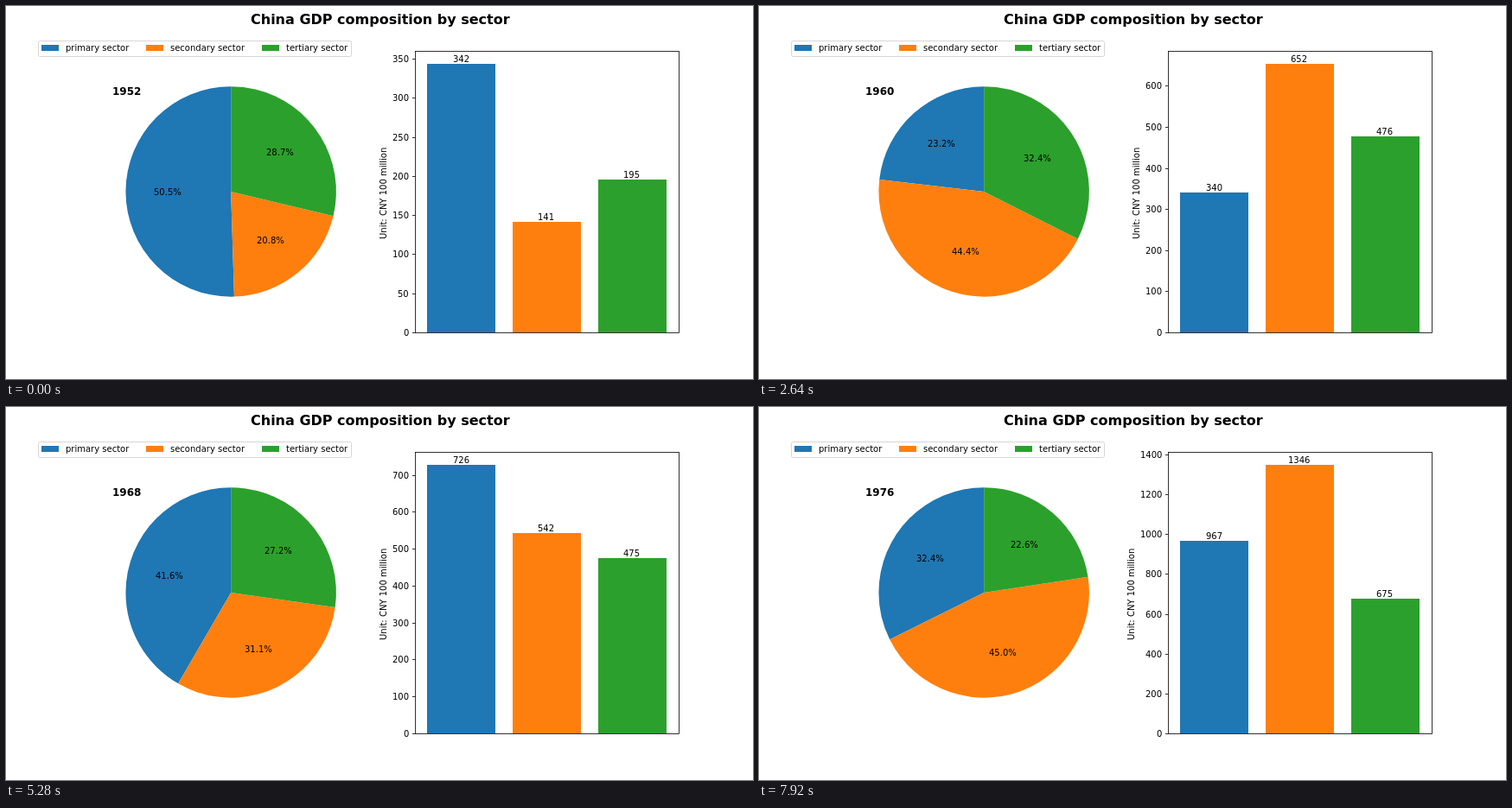
Recreate the animation shown at these times as an HTML page with a canvas. Size 864 px wide and 432 px high, loop 8000 ms.

```html
<!DOCTYPE html>
<html lang="en">
<head>
<meta charset="utf-8">
<title>GDP composition by sector</title>
<style>
  html, body { margin: 0; width: 100%; height: 100%; overflow: hidden; background: #fff; }
  canvas { display: block; }
</style>
</head>
<body>
<canvas id="stage" width="864" height="432"></canvas>
<script>
const ctx = document.getElementById('stage').getContext('2d');
const FIRST_YEAR = 1952, STEP = 330, LOOP = 8000;
const COLORS = ['#1f77b4', '#ff7f0e', '#2ca02c'];
const SECTORS = ['primary sector', 'secondary sector', 'tertiary sector'];
const PIE = { x: 260.18, y: 214.92, r: 121.74 };
const AXES = { left: 473.24, bottom: 378, height: 326.16, unit: 98.82 };

// Turning points of the three sectors; the years between are interpolated.
const KEY_YEARS = {
  1952: [342.9, 141.1, 195.1],
  1955: [421, 221.5, 269.1],
  1957: [430, 317.2, 324.2],
  1958: [445.9, 484.9, 381.5],
  1960: [340.7, 652.5, 476.9],
  1961: [441.1, 391.6, 399.6],
  1963: [497.5, 412.9, 337.9],
  1966: [702.2, 715.1, 471.4],
  1968: [726.3, 542.7, 475.1],
  1970: [793.3, 919.3, 567.1],
  1972: [827.4, 1091.8, 633.2],
  1976: [967, 1346, 675.6]
};

function valuesFor(year) {
  const years = Object.keys(KEY_YEARS).map(Number);
  const from = years.findLast(y => y <= year);
  const to = years.find(y => y >= year);
  const mix = (year - from) / (to - from || 1);
  return KEY_YEARS[from].map((value, i) => value + mix * (KEY_YEARS[to][i] - value));
}

// anchor: 0 = left, 0.5 = centre, 1 = right; returns the text width
function text(str, x, baseline, anchor = 0, font = '10px') {
  ctx.font = `${font} "DejaVu Sans", sans-serif`;
  ctx.fillStyle = '#000';
  const width = ctx.measureText(str).width;
  ctx.fillText(str, Math.floor(x - anchor * width), Math.floor(baseline));
  return width;
}

function fillBox(color, x, y, w, h) {
  ctx.fillStyle = color;
  ctx.fillRect(x, y, w, h);
}

function drawLegend() {
  ctx.strokeStyle = '#d6d6d6';
  ctx.lineWidth = 1;
  ctx.beginPath();
  ctx.roundRect(37.5, 40.5, 362, 18, 2);
  ctx.stroke();
  let x = 41;
  SECTORS.forEach((name, i) => {
    fillBox(COLORS[i], x, 45, 20, 7);
    x = Math.round(x + 48 + text(name, x + 28, 52));
  });
}

function drawPie(values) {
  const total = values.reduce((a, b) => a + b);
  let start = -Math.PI / 2;
  const labels = values.map((value, i) => {
    const sweep = 2 * Math.PI * value / total;
    const middle = start - sweep / 2;
    ctx.fillStyle = COLORS[i];
    ctx.beginPath();
    ctx.moveTo(PIE.x, PIE.y);
    ctx.arc(PIE.x, PIE.y, PIE.r, start, start - sweep, true);
    ctx.fill();
    start -= sweep;
    return [(100 * value / total).toFixed(1) + '%', middle];
  });
  for (const [label, angle] of labels) {
    text(label, PIE.x + 0.6 * PIE.r * Math.cos(angle),
      PIE.y + 0.6 * PIE.r * Math.sin(angle) + 3.5, 0.5);
  }
}

function tickStep(limit) {
  const raw = limit / 9;
  const power = 10 ** Math.floor(Math.log10(raw));
  return power * [1, 2, 2.5, 5, 10].find(n => n * power >= raw);
}

function drawBars(values) {
  const limit = 1.05 * Math.max(...values);
  const toY = value => AXES.bottom - AXES.height * value / limit;

  values.forEach((value, i) => {
    const left = AXES.left + (0.14 + i) * AXES.unit;
    const x = Math.round(left), top = Math.round(toY(value));
    fillBox(COLORS[i], x, top, Math.round(left + 0.8 * AXES.unit) - x, AXES.bottom - top);
    text(Math.floor(value), left + 0.4 * AXES.unit, toY(value) - 1.6, 0.5);
  });

  ctx.strokeStyle = '#000';
  ctx.lineWidth = 0.8;
  ctx.strokeRect(473.5, 52.5, 305, 326);

  const step = tickStep(limit);
  for (let tick = 0; tick <= limit; tick += step) {
    const y = Math.round(toY(tick));
    ctx.beginPath();
    ctx.moveTo(473.5, y + 0.5);
    ctx.lineTo(470, y + 0.5);
    ctx.stroke();
    text(tick, 466.5, y + 4, 1);
  }

  // The axis title makes room for four-digit ticks.
  ctx.save();
  ctx.translate(limit >= 1000 ? 434 : 440, 216);
  ctx.rotate(-Math.PI / 2);
  text('Unit: CNY 100 million', 0, 0, 0.5);
  ctx.restore();
}

function draw(now) {
  const year = FIRST_YEAR + Math.floor(now % LOOP / STEP);
  const values = valuesFor(year);
  fillBox('#fff', 0, 0, 864, 432);
  text('China GDP composition by sector', 433, 21, 0.5, 'bold 16px');
  drawLegend();
  text(year, 123, 103, 0, 'bold 12px');
  drawPie(values);
  drawBars(values);
}

const startTime = performance.now();
function loop() {
  draw(performance.now() - startTime);
  requestAnimationFrame(loop);
}
loop();
</script>
</body>
</html>
```
